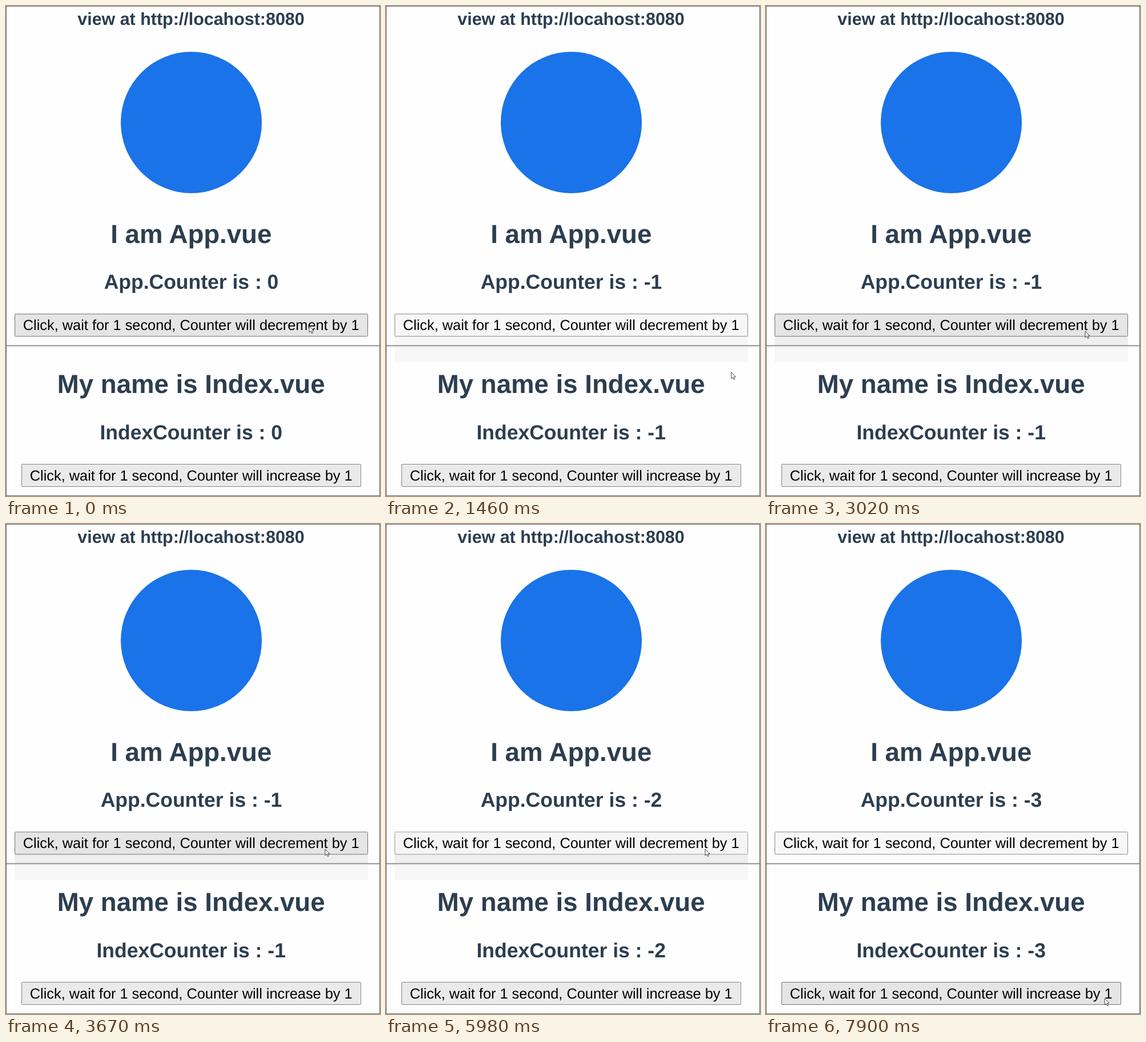
Recreate the animation shown at these times as an HTML page. Size 655 px wide and 856 px high, loop 8 s.

```html
<!DOCTYPE html>
<html lang="en">
<head>
<meta charset="utf-8">
<title>Counter demo</title>
<style>
  html, body { margin: 0; width: 100%; height: 100%; overflow: hidden; background: #fefefe; }
  svg { display: block; }
  text { font-family: "Liberation Sans", Arial, sans-serif; text-anchor: middle; text-rendering: geometricPrecision; }
  .heading { font-weight: bold; fill: #2c3e50; }
  .h1 { font-size: 45.6px; }
  .h2 { font-size: 35.5px; }
  .label { font-size: 25.35px; }
  .button { fill: #eaeaea; stroke: #858585; }
  .away { fill: #f7f7f7; }
  .hover { fill: #e5e5e5; stroke: #707070; }
  .pressed { fill: #f5f5f5; stroke: #999; }
</style>
</head>
<body>
<svg width="655" height="856" viewBox="0 0 655 856">
  <rect width="655" height="856" fill="#fefefe"/>
  <rect id="band" x="15" y="577" width="619" height="45" fill="#f7f7f7"/>
  <rect id="strip" x="15" y="577" width="619" height="16" fill="#eee"/>
  <path d="M1 593.4H654" stroke="#888" stroke-width="1.6"/>
  <path d="M1 595H654" stroke="#e4e4e4" stroke-width="1.4"/>
  <rect x=".5" y=".5" width="654" height="855" fill="none" stroke="#666"/>

  <text class="heading" font-size="30.45" x="324" y="33">view at http://locahost:8080</text>
  <circle cx="324.5" cy="203.5" r="123.5" fill="#1a73e8"/>
  <text class="heading h1" x="324.3" y="414">I am App.vue</text>
  <text class="heading h2" id="appCounter" x="324.5" y="494.3"></text>
  <rect id="decrement" x="15.5" y="538" width="618" height="39" rx="1.5"/>
  <text class="label" x="324.2" y="566">Click, wait for 1 second, Counter will decrement by 1</text>

  <text class="heading h1" x="324.2" y="676.2">My name is Index.vue</text>
  <text class="heading h2" id="indexCounter" x="324.2" y="757.2"></text>
  <rect id="increase" x="27.5" y="800.5" width="594" height="39" rx="1.5"/>
  <text class="label" x="324.2" y="829">Click, wait for 1 second, Counter will increase by 1</text>

  <path id="cursor" d="M0 0V11.2L2.6 8.8 4.5 12.8 6.3 12 4.5 8.1H8Z" fill="#fff" stroke="#333" stroke-width=".9"/>
</svg>
<script>
const LOOP = 8000;
const COUNT_DELAY = 1150;
const PRESS_TIME = 120;
const HOVER_LAG = 115;
const clicks = [-400, 3550, 5980];

// The pointer rests between moves.
const rest = { x: 531, y: 559 };
const moves = [
  { start: 740, time: 10, x: 567, y: 587 },
  { start: 750, time: 280, x: 602, y: 619 },
  { start: 1340, time: 630, x: 616, y: 727 },
  { start: 1970, time: 120, x: 606, y: 742 },
  { start: 2090, time: 270, x: 597, y: 625 },
  { start: 2360, time: 150, x: 584, y: 613 },
  { start: 2510, time: 510, x: 559, y: 568 },
  { start: 7650, time: 10, x: 549, y: 597 },
  { start: 7660, time: 240, x: 593, y: 829 }
];

const $ = id => document.getElementById(id);
const clamp = v => Math.min(1, Math.max(0, v));

function pointerAt(t) {
  return moves.reduce((from, { start, time, x, y }) => {
    const k = clamp((t - start) / time);
    return { x: from.x + (x - from.x) * k, y: from.y + (y - from.y) * k };
  }, rest);
}

function isOver(button, t) {
  const { x, y } = pointerAt(t);
  const { x: left, y: top, width, height } = button.getBBox();
  return x >= left && x <= left + width && y >= top && y <= top + height;
}

// Hover highlight lingers briefly after the pointer leaves.
const isHovered = (button, t) => isOver(button, t) || isOver(button, t - HOVER_LAG);

function show(id, visible) {
  $(id).setAttribute("visibility", visible ? "visible" : "hidden");
}

function draw(t) {
  const count = -clicks.filter(c => t >= c + COUNT_DELAY).length;
  $("appCounter").textContent = `App.Counter is : ${count}`;
  $("indexCounter").textContent = `IndexCounter is : ${count}`;

  const pressed = clicks.some(c => t >= c && t < c + PRESS_TIME);
  const decrementState = pressed ? "pressed" : isHovered($("decrement"), t) ? "hover" : "away";
  $("decrement").setAttribute("class", `button ${decrementState}`);
  $("increase").setAttribute("class", isHovered($("increase"), t) ? "button hover" : "button");

  show("band", t >= 890 && t < 7780);
  show("strip", t >= 2900 && t < 7780);

  const { x, y } = pointerAt(t);
  $("cursor").setAttribute("transform", `translate(${x} ${y})`);
}

const begin = performance.now();
function tick() {
  draw((performance.now() - begin) % LOOP);
  requestAnimationFrame(tick);
}
tick();
</script>
</body>
</html>
```
